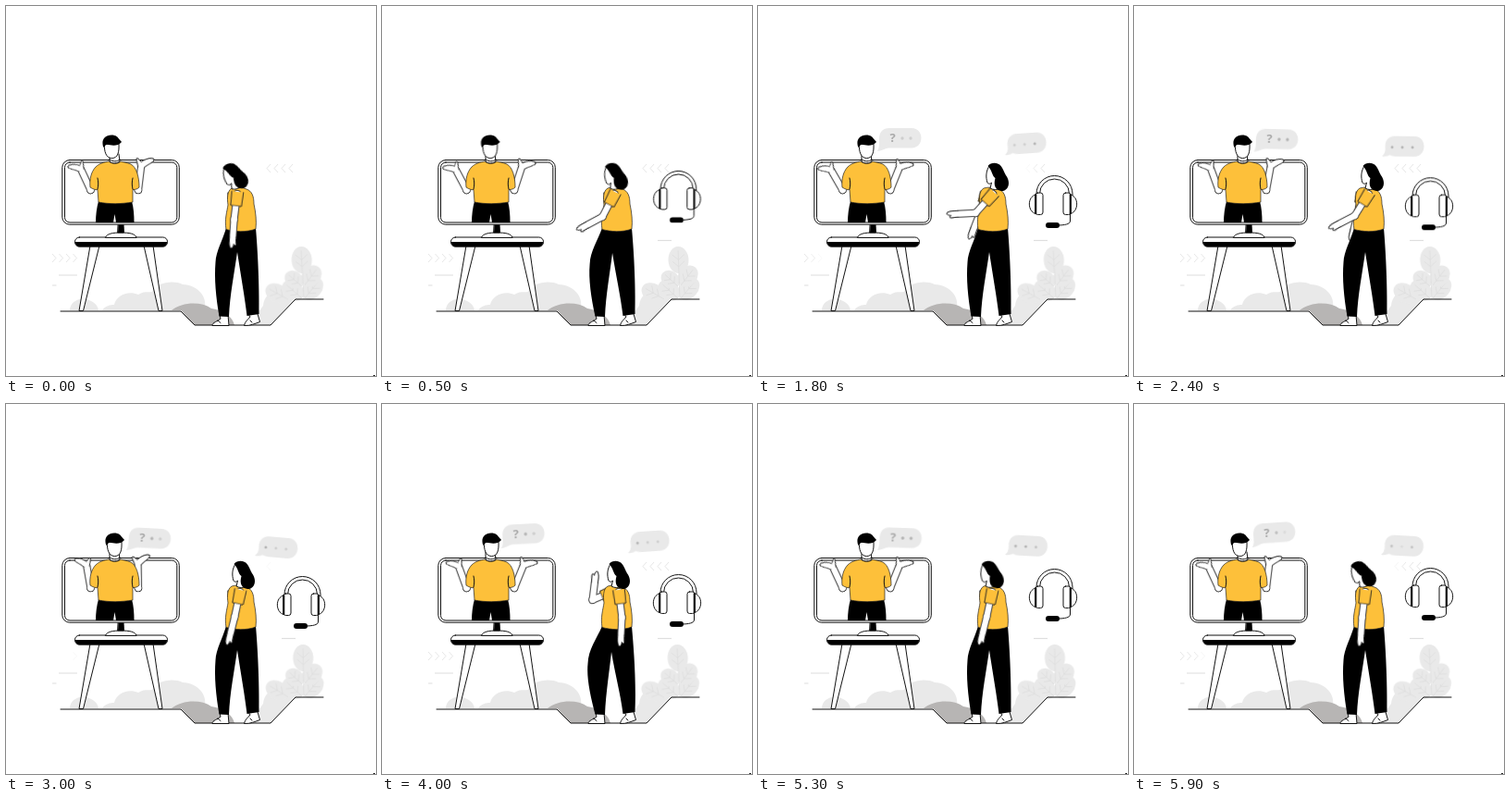
An HTML page that plays this animation: 400x400 px, repeating every 6 s.

```html
<!DOCTYPE html>
<html lang="en">
<head>
<meta charset="utf-8">
<title>Online support</title>
<style>
html, body { margin: 0; width: 100%; height: 100%; overflow: hidden; background: #fff; }
svg { display: block; width: 100vw; height: 100vh; }
.line { fill: none; stroke: #111; stroke-width: 1; stroke-linecap: round; stroke-linejoin: round; }
.white { fill: #fff; }
.black { fill: #000; }
.shirt { fill: #fdc03a; stroke: #222; stroke-width: .7; stroke-linejoin: round; }
.pale { fill: #e9e9e9; }
.dash { fill: none; stroke: #dedede; stroke-width: 1.2; }
.thin { fill: none; stroke: #dcdcdc; stroke-width: .7; }

/* limbs are drawn twice: a wide dark stroke, then a narrower white one */
.limb { fill: none; stroke-linecap: round; stroke-linejoin: round; }
.ink { stroke: #111; stroke-width: 8.2; }
.skin { stroke: #fff; stroke-width: 6.6; }
.hand { fill: #fff; stroke: #111; stroke-width: .8; }

.m-head, .m-left, .m-right, .w-head, .near, .near-fore, .near-shift, .far, .far-fore,
.pants, .w-bubble, .m-bubble { animation: 6s ease-in-out infinite; }

.m-head { animation-name: m-head; }
@keyframes m-head {
  0%, 98.3%, 100% { transform: none; }
  18.3% { transform: translateX(6px); }
  30%, 50%, 88.3% { transform: translateX(3px); }
  66.7% { transform: translateX(4px); }
}
.m-left { animation-name: m-left; }
@keyframes m-left {
  0%, 98.3%, 100% { transform: rotate(-25deg); }
  18.3% { transform: rotate(-32deg); }
  30% { transform: rotate(-30deg); }
  50% { transform: rotate(-10deg); }
  66.7% { transform: rotate(-20deg); }
  88.3% { transform: rotate(-25deg); }
}
.m-right { animation-name: m-right; }
@keyframes m-right {
  0%, 98.3%, 100% { transform: rotate(7deg); }
  18.3% { transform: rotate(33deg); }
  30%, 66.7%, 88.3% { transform: rotate(22deg); }
  50% { transform: rotate(-1deg); }
}
.w-head { animation-name: w-head; transform-origin: 252px 194px; }
@keyframes w-head {
  0%, 3%, 98.3%, 100% { transform: translateX(-6px) rotate(-18deg); }
  13%, 18.3% { transform: none; }
  30% { transform: translateX(2px); }
  50% { transform: none; }
  66.7% { transform: translateX(-1px); }
  88.3% { transform: translateX(-3px) rotate(-5deg); }
}
.pants { animation-name: pants; }
@keyframes pants {
  0%, 4%, 28%, 55%, 82%, 100% { d: path("M238 240H270C272 262 274 300 273.500 333L260.500 335C258 314 254 292 250 266C247 288 242 312 241 336L230.500 335.500C227 315 225 295 226.500 277C227 265 234 254 238 240Z"); }
  13%, 21%, 63%, 72% { d: path("M238 240H270C272 262 275 300 273.500 333L260.500 335C258 314 252 292 248 268C246 288 242 312 241 336L230.500 335.500C225 315 221 295 222.500 281C223 265 232 254 238 240Z"); }
}
.near-shift { animation-name: near-shift; }
@keyframes near-shift {
  0%, 98.3%, 100% { transform: translateX(-3px); }
  18.3%, 50%, 88.3% { transform: none; }
  30% { transform: translateX(1px); }
  66.7% { transform: translateX(3px); }
}
.near { animation-name: near; }
@keyframes near {
  0%, 4%, 94%, 100% { transform: rotate(7deg); }
  15%, 21% { transform: rotate(70deg); }
  28%, 36% { transform: rotate(42deg); }
  46%, 55%, 82%, 88.3% { transform: rotate(12deg); }
  63%, 72% { transform: rotate(-7deg); }
}
.near-fore { animation-name: near-fore; }
@keyframes near-fore {
  0%, 4%, 94%, 100% { transform: rotate(-3deg); }
  15%, 21% { transform: rotate(112deg); }
  28%, 36% { transform: rotate(45deg); }
  46%, 55%, 88.3% { transform: rotate(2deg); }
  63%, 72% { transform: rotate(10deg); }
}
.far { animation-name: far; }
@keyframes far {
  0%, 22%, 46%, 55%, 82%, 100% { transform: rotate(0deg); }
  28%, 36% { transform: rotate(17deg); }
  63%, 72% { transform: rotate(67deg); }
}
.far-fore { animation-name: far-fore; }
@keyframes far-fore {
  0%, 22%, 46%, 55%, 82%, 100% { transform: rotate(0deg); }
  28%, 36% { transform: rotate(4deg); }
  63%, 72% { transform: rotate(120deg); }
}
.w-bubble { animation-name: w-bubble; transform-origin: 268px 162px; }
@keyframes w-bubble {
  0%, 11% { transform: scale(0); }
  16%, 18.3% { transform: translateX(1px); }
  30% { transform: translateY(-1px) rotate(-4deg); }
  50% { transform: translate(2px, 2px) rotate(5deg); }
  66.7% { transform: translate(-1px, -1px) rotate(-4deg); }
  88.3%, 100% { transform: translateY(1px) rotate(3deg); }
}
.m-bubble { animation-name: m-bubble; transform-origin: 129px 157px; }
@keyframes m-bubble {
  0%, 23.5% { transform: scale(0); }
  28.5%, 30% { transform: none; }
  50% { transform: translate(1px, 1px) rotate(3deg); }
  66.7% { transform: translateY(-1px) rotate(-3deg); }
  88.3% { transform: translateY(1px) rotate(2deg); }
  95%, 100% { transform: translate(-1px, -2px) rotate(-4deg); }
}
.float { animation: float 3s ease-in-out infinite alternate; }
@keyframes float { from { transform: translateY(-3px); } to { transform: translateY(6px); } }
.pop { animation: pop 6s ease-out infinite; transform-origin: 319px 210px; }
@keyframes pop { 0%, 1% { transform: scale(0); } 9%, 100% { transform: none; } }
.blink { animation: blink 1s linear infinite; animation-delay: calc(var(--i) * .2s - 1s); }
@keyframes blink { 0%, 40%, 100% { opacity: 1; } 70% { opacity: .25; } }
.flow { animation: flow 2s linear infinite; animation-delay: calc(var(--i) * .08s - 2s); }
@keyframes flow { 0%, 28% { opacity: 1; } 42%, 80% { opacity: 0; } 88%, 100% { opacity: 1; } }
.grow { animation: grow 6s ease-out infinite; transform-origin: 313px 253px; }
@keyframes grow { 0% { transform: scaleX(0); } 6%, 100% { transform: none; } }
.sway { animation: sway 1s ease-in-out infinite alternate; transform-origin: 322px 318px; }
@keyframes sway { from { transform: rotate(-1deg); } to { transform: rotate(1deg); } }
</style>
</head>
<body>
<svg viewBox="0 0 400 400">
  <!-- scenery -->
  <path class="pale" d="M69 329C69 321 77 316 85 317C94 318 99 323 100 329Z"/>
  <path class="pale" d="M104 329C107 324 113 323 117 323C119 313 132 307 143 312C149 308 154 310 158 309C163 299 180 296 191 301C207 302 218 313 215 329Z"/>
  <path class="pale" d="M269 345C268 336 274 330 278 324C279 311 292 304 302 311L313 317.5L286 345Z"/>
  <path fill="#b7b5b4" d="M179 329C190 320 211 319 222 327C236 329 245 336 247 345H204L189 329Z"/>
  <g class="sway" id="plant"></g>
  <g class="dash">
    <path d="M57 291H77M50 302H54.500"/>
    <path class="grow" d="M298 253.500H313"/>
  </g>
  <g class="thin" id="chevrons"></g>
  <path class="line" d="M59 330H189L204 345H286L313 317H343"/>
  <path fill="#222" d="M397 399h2v1h-2z"/>

  <!-- table and monitor -->
  <g class="line">
    <path class="white" d="M91 259L79 329.500H83.500L101 259ZM149 259L165 329.500H169L159 259Z"/>
    <rect class="white" x="74.500" y="250" width="100" height="10" rx="4.800"/>
    <path class="black" d="M75 255.500H174C173.500 258.500 172 260 170 260H79C77 260 75.500 258.500 75 255.500Z"/>
    <path class="white" d="M107.500 250C109 246 116 245 124 245C133 245 140 246 141 250Z"/>
    <path class="black" d="M121.500 236H127L127.500 245H121Z"/>
    <rect class="white" x="60.800" y="166.500" width="126.500" height="69.700" rx="8"/>
    <rect x="63.500" y="169" width="121.300" height="65" rx="5.500"/>
  </g>

  <!-- man -->
  <path class="black" d="M100 211H136C138 218 138.500 226 138.500 234H119L117.500 225L116 234H97C97 226 98 218 100 211Z"/>
  <defs>
    <path id="palm" class="hand" d="M-3.300-25C-4-29-7-33-5.500-34C-3.500-34-2-31-.5-30.500C4-35 11-37 13-35C13-32 8-30 3.300-25"/>
    <path id="mitt" class="hand" d="M-3.300 19C-3.600 23-3.500 29-1.500 31C0 31.500 1 29 1.300 26.500C2.500 28.500 4 28.500 3.800 26C3.600 23 3.400 21 3.300 19"/>
  </defs>
  <g class="limb ink">
    <g transform="translate(91.500 199)">
      <path d="M0 0L4-7"/>
      <g class="m-left"><path d="M0 0V-24"/><use href="#palm" transform="scale(-.9 .95)"/></g>
    </g>
  </g>
  <g class="limb ink">
    <g transform="translate(143 199)">
      <path d="M0 0L-4-7"/>
      <g class="m-right"><path d="M0 0V-25"/><use href="#palm"/></g>
    </g>
  </g>
  <path class="shirt" d="M111 168C106 169 101 170 97 174C92 179 90 188 91 196C94 198 97 199 99 198.500L100 212C112 214.500 125 214 137 212L137 198.500C140 198.500 142 198 144 196C144 185 141 174 135 171C130 169 127 169 124 168C121 171 115 171 111 168Z"/>
  <path class="line" stroke-width=".7" d="M99 198C100 194 100 190 99 186M137 198C136 194 136 190 137 186"/>
  <path class="line white" d="M112 159V168C115 171 121 170 123 168L122 160"/>
  <path class="line" stroke-width="1.500" d="M112 166C116 168.500 120 168.500 123 166"/>
  <g class="m-head">
    <path class="line white" d="M106.500 150C106 157 108 164.500 114.500 164.500C121 164.500 122.500 158 122 149Z"/>
    <path class="black" d="M105.500 153C102.500 146 106 139.500 114 139.500C119 139.500 121 142 122 143.500C123 145 124.500 146 125 147C121 152 114 151 109 149.500C107.500 150 107 152 105.500 153Z"/>
  </g>

  <!-- woman -->
  <g class="limb ink">
    <g transform="translate(246 204)">
      <g class="far">
        <path d="M0 0V20"/>
        <g transform="translate(0 20)"><g class="far-fore"><path d="M0 0V20"/><use href="#mitt"/></g></g>
        <path class="shirt" d="M-6-2L-5.500 9H5.500L6-2"/>
      </g>
    </g>
  </g>
  <g class="line white">
    <path d="M231 334L232 338C229 341 223 342 223 345.500H241L240 334Z"/>
    <path d="M262 333L264 336C262 339 258 341 257.500 345.500C264 346 270 343 274.500 341.500L272 333Z"/>
    <path d="M229 340L232 342.500M264 340L266 342"/>
  </g>
  <path class="black pants"/>
  <path class="shirt" d="M244 197C248 195.500 256 196 260 198C266 200 268 206 268 214C270 223 271 233 270 241C260 245 247 244 238 241.500C236 231 239 222 240 215C239 208 239 200 244 197Z"/>
  <g class="w-head">
    <path class="line white" d="M248 173C244.500 178 244 185 246 191C247.500 193 249.500 192 250.500 191L249 197C252 199 257 199 259 197L258 180Z"/>
    <path class="black" d="M246.500 173C250 168.500 258 169 261 173.500C264 178 264 180 267 184.500C271 191 269 200 261 200C254 199 252.500 193 254.500 186C251 184 251 177 246.500 173Z"/>
  </g>
  <g class="limb ink">
    <g transform="translate(253 203)">
      <g class="near-shift"><g class="near">
        <path d="M0 0V28"/>
        <g transform="translate(0 28)"><g class="near-fore"><path d="M0 0V19"/><use href="#mitt"/></g></g>
        <path class="shirt" d="M-6-2L-5.500 13H6L6.500-2"/>
      </g></g>
    </g>
  </g>

  <!-- headset -->
  <g class="pop"><g class="float">
    <g class="line">
      <path class="white" d="M301 204V200A19.500 19.500 0 0 1 340 200V204H336.500V200A16 16 0 0 0 304.500 200V204Z"/>
      <path class="white" d="M300 201C291 203 291 219 300 221.500ZM338 201C347 203 347 219 338 221.500Z"/>
      <rect class="white" x="300" y="199" width="8" height="23.500" rx="2.500"/>
      <rect class="white" x="330" y="199" width="8" height="23.500" rx="2.500"/>
      <path stroke-width="2.200" d="M300.200 201V221M337.800 201V221"/>
      <path d="M337.500 222V229C337.500 232 335 233.500 326 234"/>
    </g>
    <rect class="black" x="311" y="231" width="15" height="6" rx="3"/>
  </g></g>

  <!-- speech bubbles -->
  <g class="w-bubble">
    <path class="pale" d="M281 140H302C316 140 316 162 302 162H282C279 162 277 161 275.500 160.500C273 162 270 162.500 267 162C269.500 160 271 157 270.500 152C270 144 275 140 281 140Z"/>
    <g id="w-dots" fill="#b4b4b4"></g>
  </g>
  <g class="m-bubble">
    <path class="pale" d="M142 132H166C180 132 180 153.500 166 153.500H141C137 154 133 157 129 157C131 154 131 150 131 144C131 136 135 132 142 132Z"/>
    <text x="145.500" y="147" text-anchor="middle" font-family="'Open Sans', sans-serif" font-weight="700" font-size="13" fill="#a9a9a9">?</text>
    <g id="m-dots" fill="#b4b4b4"></g>
  </g>
</svg>
<script>
const el = id => document.getElementById(id);
const fill = (id, items, draw) => { el(id).innerHTML = items.map(draw).join(''); };

document.querySelectorAll('.ink').forEach(limb => {
  const copy = limb.cloneNode(true);
  copy.classList.replace('ink', 'skin');
  limb.after(copy);
});

const dot = (y, r) => (x, i) => `<circle class="blink" style="--i:${i}" cx="${x}" cy="${y}" r="${r}"/>`;
fill('w-dots', [278, 289, 300], dot(152, 1.5));
fill('m-dots', [156, 165], dot(143, 1.7));

fill('chevrons', [0, 1, 2, 3], i =>
  `<path class="flow" style="--i:${i}" d="M${50 + i * 7.5} 268l4 4.500l-4 4.500M${310 - i * 8} 171l-4 4.500l4 4.500"/>`);

// each leaf: base x, base y, length, half width, angle
const leaves = [
  [305, 317, 27, 10, -60], [320, 316, 26, 10, -48], [323, 316, 27, 10, 40],
  [320, 303, 22, 9, -48], [323, 302, 25, 10, 38], [321, 289, 29, 11, -2]
];
fill('plant', leaves, ([x, y, n, w, a]) =>
  `<g transform="translate(${x} ${y}) rotate(${a})">
    <ellipse class="pale" cy="${-n / 2}" rx="${w}" ry="${n / 2}"/>
    <path class="thin" d="M0 0V${-n * .85}M${-w * .6} ${-n * .7}L0 ${-n * .5}L${w * .6} ${-n * .7}M${-w * .6} ${-n * .45}L0 ${-n * .25}L${w * .6} ${-n * .45}"/>
  </g>`);
el('plant').insertAdjacentHTML('beforeend', '<path class="thin" d="M321 289L322 317"/>');
</script>
</body>
</html>
```
